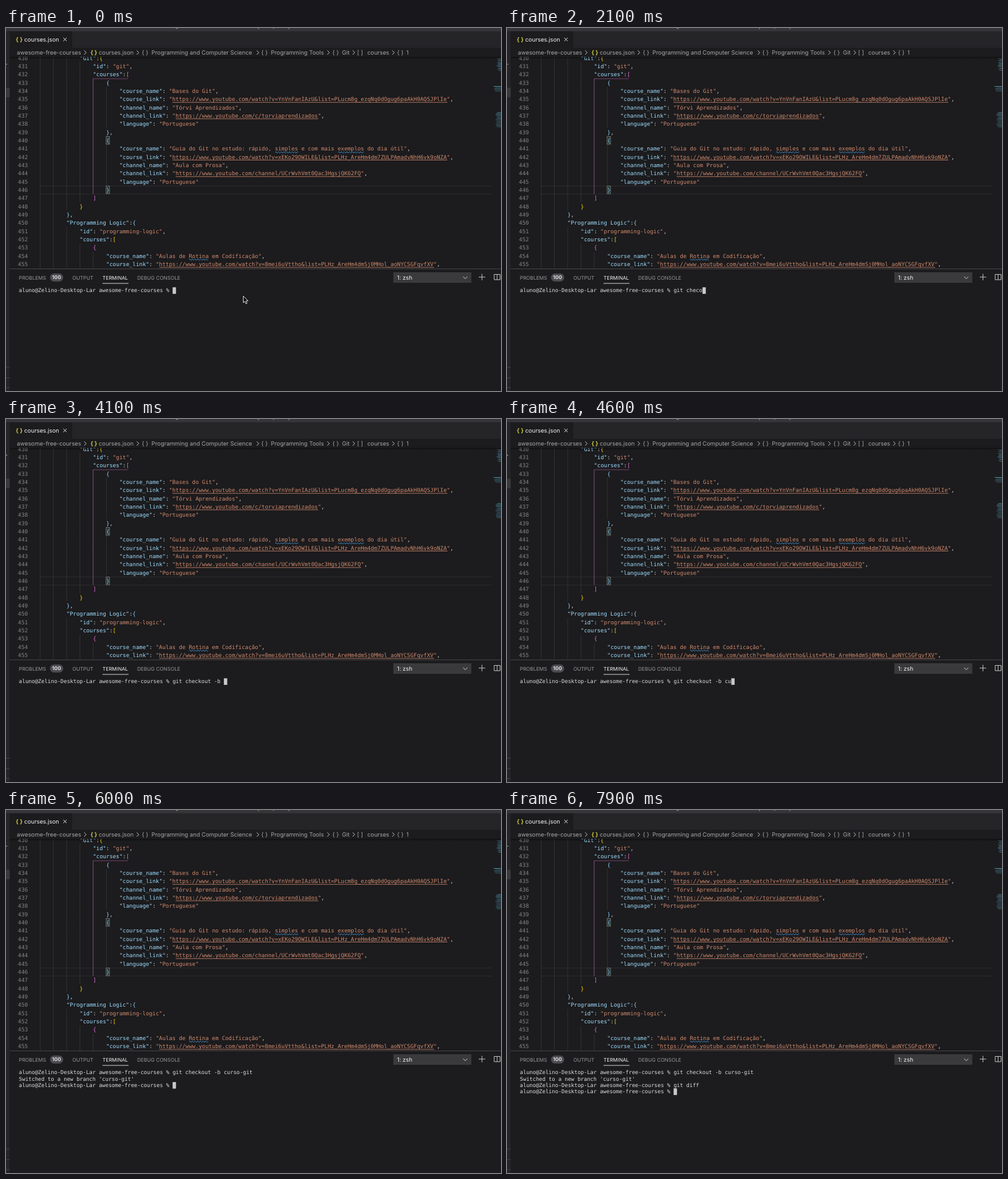
Recreate the animation shown at these times as an HTML page. Size 800 px wide and 587 px high, loop 8 s.

```html
<!DOCTYPE html>
<html lang="en">
<head>
<meta charset="utf-8">
<title>Editor and terminal</title>
<style>
html, body { margin: 0; width: 100%; height: 100%; overflow: hidden; background: #1c1b1d; }
svg { display: block; width: 800px; height: 587px; }
text { white-space: pre; text-rendering: geometricPrecision; }
.code { font: 8.893px "DejaVu Sans Mono", monospace; fill: #d4d4d4; }
.term { font: 8.6px "DejaVu Sans Mono", monospace; fill: #dededf; }
.num { fill: #858585; }
.key { fill: #9cdcfe; }
.str { fill: #ce8a6e; }
.ui { font: 9.35px Inter, "Open Sans", sans-serif; fill: #a5a5a6; }
.tabs { font: 8.15px Inter, "Open Sans", sans-serif; fill: #98989a; }
.white { fill: #f2f2f2; }
.json { fill: #cbcb41; font-weight: 700; }
.line { fill: none; stroke: #c5c5c5; stroke-width: 1; }
</style>
</head>
<body>
<svg viewBox="0 0 800 587" xmlns="http://www.w3.org/2000/svg">
  <defs>
    <clipPath id="view"><rect x="6" y="46.5" width="794" height="342.5"/></clipPath>
    <linearGradient id="shade" x2="0" y2="1">
      <stop stop-color="#000" stop-opacity=".45"/>
      <stop offset="1" stop-color="#000" stop-opacity="0"/>
    </linearGradient>
  </defs>
  <rect width="800" height="587" fill="#1c1b1d"/>

  <!-- editor -->
  <g clip-path="url(#view)">
    <path d="M55 255.5H785M55 268.5H785" stroke="#2b2a2c"/>
    <g id="guides" stroke="#39383a" stroke-width=".8"></g>
    <path d="M197 82H140.8V268.5" fill="none" stroke="#da70d6" stroke-opacity=".5" stroke-width=".9"/>
    <g id="boxes" fill="#20302a" stroke="#858587" stroke-width=".8"></g>
    <g id="code"></g>
    <g id="map" fill="#4c8ba3"></g>
    <rect x="6" y="46.5" width="794" height="4" fill="url(#shade)"/>
  </g>

  <!-- title bar, tab, breadcrumbs -->
  <rect y="5.5" width="800" height="26.5" fill="#252427"/>
  <rect width="800" height="5.5" fill="#363538"/>
  <path d="M274.5 0h3v1.2h-3zM407.500 0h1.500v1.500h-1.500zM431.500 0h2v1h-2zM456.500 0h1.500v1.500h-1.500z" fill="#8b8b8c"/>
  <rect x="6" y="5.5" width="101" height="27" fill="#1c1b1d"/>
  <text class="ui json" x="15.800" y="22.2">{ }</text>
  <text class="ui white" x="29.500" y="22.2">courses.json</text>
  <path class="line white" d="M92.600 15.800l5.400 5.400m0-5.400l-5.400 5.400" style="stroke:#e6e6e6"/>
  <g id="crumbs"></g>

  <!-- side bar edge -->
  <rect y="5.5" width="6" height="581.5" fill="#252427"/>
  <rect y="96.500" width="6" height="15.500" fill="#39393d"/>
  <path d="M0 58.500h2" stroke="#a0a0a0"/>
  <path d="M0 548.500h6M0 565.500h6M0 581.500h6" stroke="#414043"/>

  <!-- panel -->
  <path d="M6 389.500H800" stroke="#444346"/>
  <g class="tabs">
    <text x="20.700" y="406.500">PROBLEMS</text>
    <rect x="71" y="397" width="21.500" height="13" rx="6.500" fill="#4d4c50"/>
    <text class="white" x="81.700" y="406.400" text-anchor="middle" font-weight="600">100</text>
    <text x="107.200" y="406.500">OUTPUT</text>
    <text class="white" x="156" y="406.500">TERMINAL</text>
    <text x="212" y="406.500">DEBUG CONSOLE</text>
  </g>
  <path d="M156 413H198" stroke="#e7e7e7" stroke-width=".9"/>
  <rect x="626" y="395" width="126" height="17" fill="#3a393c"/>
  <text class="ui white" x="632" y="407.200">1: zsh</text>
  <path class="line" d="M738.800 402l3.400 3.600 3.400-3.600M764 402.800h10.400M769.200 397.600v10.400M789 398.500h9.500v8.500h-9.500zM793.800 398.500v8.500"/>

  <g id="term"></g>
  <rect id="caret" width="5.400" height="10.600" fill="#c9c9ca"/>
  <path id="mouse" d="M383.500 433.500v10.600l2.500-2.200 1.700 4 1.900-.8-1.700-3.900h3.400z" fill="#0a0a0a" stroke="#f4f4f4" stroke-width=".9"/>
</svg>

<script>
const NS = "http://www.w3.org/2000/svg";
const $ = id => document.getElementById(id);

function add(parent, tag, attrs, text) {
  const el = document.createElementNS(NS, tag);
  for (const k in attrs) el.setAttribute(k, attrs[k]);
  if (text !== undefined) el.textContent = text;
  parent.appendChild(el);
  return el;
}

// ---- code ----
const FIRST = 430, LEFT = 54.8, CHAR = 5.354, ROW = 13.342;
const CYCLE = ["#ffd700", "#da70d6", "#87cefa"];
const colX = c => LEFT + c * CHAR;
const rowY = n => 61.7 + (n - 431) * ROW;
const video = "https://www.youtube.com/watch?v=";

const lines = [
  [12, '"Git":{'],
  [16, '"id": "git",'],
  [16, '"courses":['],
  [20, '{'],
  [24, '"course_name": "Bases do Git",'],
  [24, `"course_link": "${video}YnVnFanIAzU&list=PLucm8g_ezqNq0dOgug6paAkH0AQSJPlIe",`],
  [24, '"channel_name": "Tórvi Aprendizados",'],
  [24, '"channel_link": "https://www.youtube.com/c/torviaprendizados",'],
  [24, '"language": "Portuguese"'],
  [20, '},'],
  [20, '{'],
  [24, '"course_name": "Guia do Git no estudo: rápido, simples e com mais exemplos do dia útil",'],
  [24, `"course_link": "${video}xEKo29OWILE&list=PLHz_AreHm4dm7ZULPAmadvNhH6vk9oNZA",`],
  [24, '"channel_name": "Aula com Prosa",'],
  [24, '"channel_link": "https://www.youtube.com/channel/UCrWvhVmt0Qac3HgsjQK62FQ",'],
  [24, '"language": "Portuguese"'],
  [20, '}'],
  [16, ']'],
  [12, '}'],
  [8, '},'],
  [8, '"Programming Logic":{'],
  [12, '"id": "programming-logic",'],
  [12, '"courses":['],
  [16, '{'],
  [20, '"course_name": "Aulas de Rotina em Codificação",'],
  [20, `"course_link": "${video}8mei6uVttho&list=PLHz_AreHm4dmSj0MHol_aoNYCSGFqvfXV",`]
];

function wave(y, from, len) {
  const end = colX(from + len);
  let d = `M${colX(from)} ${y}`;
  for (let x = colX(from), i = 0; x + 2.2 <= end; x += 2.2, i++) d += `q1.1 ${i % 2 ? 2 : -2} 2.2 0`;
  add($("code"), "path", { d, fill: "none", stroke: "#4a9fe0", "stroke-width": 0.9 });
}

lines.forEach(([indent, src], i) => {
  const n = FIRST + i, y = rowY(n), code = $("code");
  for (let c = 0; c < indent; c += 4)
    add($("guides"), "path", { d: `M${colX(c) + 0.4} ${y - ROW / 2}v${ROW}` });
  add(code, "text", { class: "code num", x: 19.3, y: y + 3.2 }, n);
  const row = add(code, "text", { class: "code", x: colX(indent), y: y + 3.2 });
  for (const t of src.match(/"[^"]*"|[{}[\]]|[^"{}[\]]+/g)) {
    const span = add(row, "tspan", {}, t);
    if (t[0] === '"') span.setAttribute("class", src.startsWith(t) ? "key" : "str");
    else if (/[{}[\]]/.test(t)) span.setAttribute("fill", CYCLE[indent / 4 % 3]);
  }
  const url = src.match(/https[^"]*/);
  if (url) add(code, "rect", {
    class: "str", x: colX(indent + url.index), y: y + 4.7, width: url[0].length * CHAR, height: 0.8
  });
  for (const word of ["simples", "exemplos", "Rotina"]) {
    const at = src.indexOf(word);
    if (at > 0) wave(y + 6, indent + at, word.length);
  }
});

for (const n of [440, 446])
  add($("boxes"), "rect", { x: colX(20), y: rowY(n) - 6.2, width: CHAR, height: 12.4 });

// ---- minimap ----
const rnd = i => Math.abs(Math.sin(i * 12.99) * 43758.5) % 1;
for (const [top, bottom, x] of [[49, 69, 793], [94, 103, 789], [136, 161, 791]])
  for (let y = top; y < bottom; y += 1.6)
    add($("map"), "rect", {
      x: x + rnd(y) * 3, y, width: 11, height: 0.9, opacity: 0.3 + rnd(y + 7) * 0.5
    });
add($("map"), "rect", { x: 788, y: 94, width: 12, height: 1 });

// ---- breadcrumbs ----
const crumbs = [
  [17.5, "awesome-free-courses"], [136.5, "{ }", "json"], [150, "courses.json"],
  [219.5, "{ }"], [235, "Programming and Computer Science"],
  [412.5, "{ }"], [428, "Programming Tools"], [527.5, "{ }"], [543, "Git"],
  [567.5, "[ ]"], [584, "courses"], [632, "{ }"], [647, "1"]
];
for (const [x, t, cls = ""] of crumbs)
  add($("crumbs"), "text", { class: "ui " + cls, x, y: 43 }, t);
for (const x of [128, 213, 407, 521, 562, 626])
  add($("crumbs"), "path", { class: "line", d: `M${x - 1.7} 36.4l3.3 3.3-3.3 3.3`, "stroke-width": 0.9 });

// ---- terminal ----
const LOOP = 8000, CELL = 5.177, STEP = 10.33;
const prompt = "aluno@Zelino-Desktop-Lar awesome-free-courses % ";
const replies = ["Switched to a new branch 'curso-git'\n", ""];

// Each burst: start, gap between keys, keys (< erases, \n enters).
const bursts = [
  [1150, 110, "git checo"], [2250, 120, "<kout"], [3300, 200, " -"], [3800, 130, "b "],
  [4420, 140, "curso-g"], [5420, 110, "it"], [5750, 0, "\n"],
  [7000, 85, "git diff"], [7760, 0, "\n"]
];
const keys = bursts.flatMap(([t, gap, s]) => [...s].map((ch, i) => [t + i * gap, ch]));

function screenAt(t) {
  let out = prompt, entered = 0;
  for (const [at, ch] of keys) {
    if (at > t) break;
    if (ch === "<") out = out.slice(0, -1);
    else if (ch === "\n") out += "\n" + replies[entered++] + prompt;
    else out += ch;
  }
  return out.split("\n");
}

const rows = [0, 1, 2, 3].map(i =>
  add($("term"), "text", { class: "term", x: 20.8, y: 427.2 + i * STEP }));

let shown = "";
function draw(now) {
  const t = now % LOOP, screen = screenAt(t), all = screen.join("\n");
  if (all !== shown) {
    shown = all;
    rows.forEach((r, i) => r.textContent = screen[i] || "");
    const last = screen.length - 1;
    $("caret").setAttribute("x", 20.8 + screen[last].length * CELL);
    $("caret").setAttribute("y", 419.3 + last * STEP);
  }
  $("mouse").style.display = t < keys[0][0] ? "" : "none";
  requestAnimationFrame(draw);
}
draw(performance.now());
</script>
</body>
</html>
```
